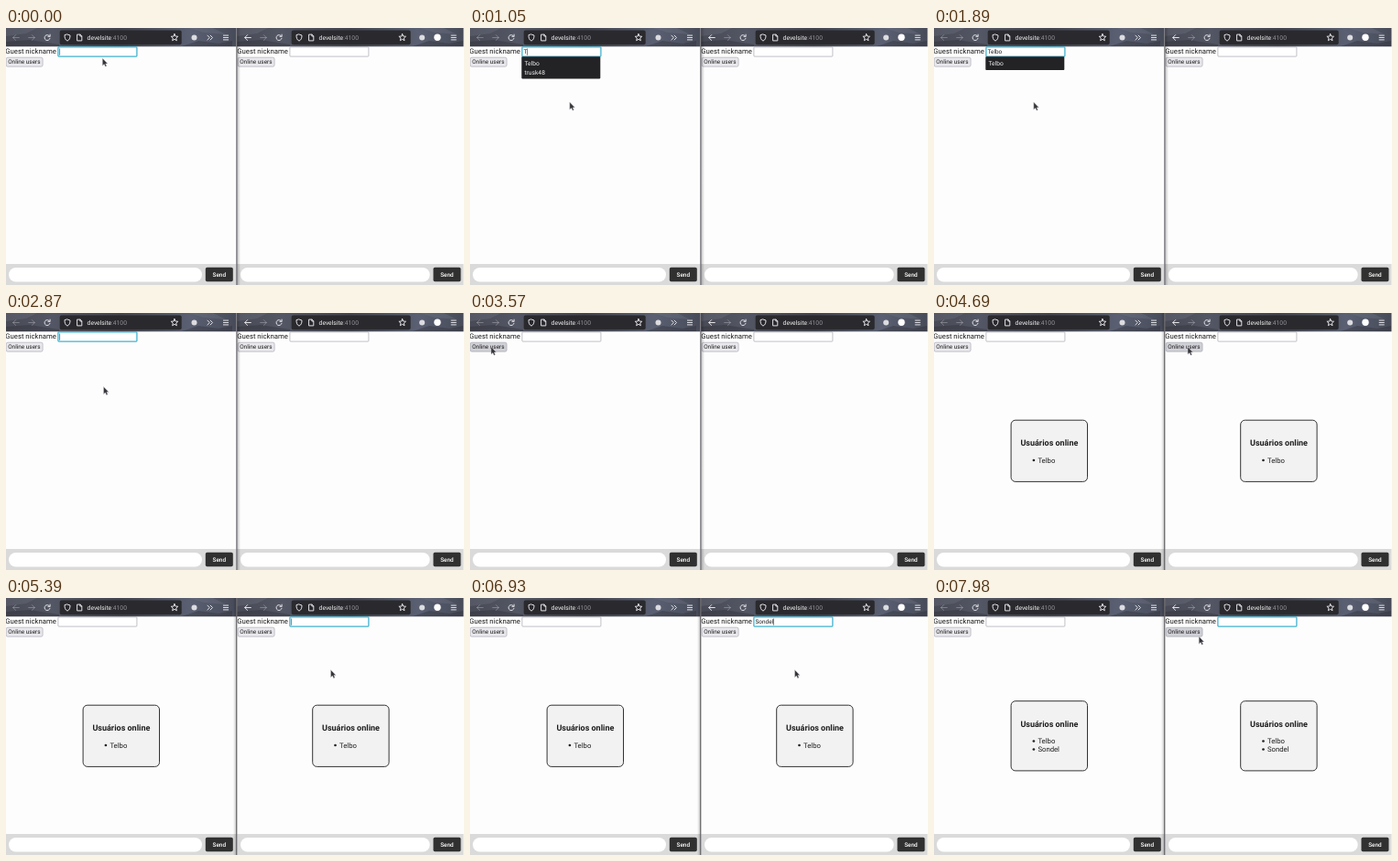
An HTML page that plays this animation: 500x281 px, repeating every 8000 ms.

```html
<!DOCTYPE html>
<html lang="en">
<head>
<meta charset="utf-8">
<title>Chat demo</title>
<style>
  html, body { margin: 0; width: 100%; height: 100%; overflow: hidden; background: #fff; }
  svg { display: block; width: 100%; height: 100%; }
  text { font: 7.72px Roboto, sans-serif; fill: #1c1c1c; text-rendering: geometricPrecision; white-space: pre; }
  .small { font-size: 6.43px; }
  .title { font-size: 9.02px; font-weight: 700; }
  .send { font-size: 6.43px; font-weight: 500; fill: #fff; }
  .url { font-size: 6.73px; fill: #f4f4f6; }
  .url tspan { fill: #929298; }
  .popup text { font-size: 6.7px; fill: #eee; }
  .icon { fill: none; stroke: #e2e2e6; stroke-width: 1; stroke-linecap: round; stroke-linejoin: round; }
  .dim { opacity: .32; }
</style>
</head>
<body>
<svg id="stage" viewBox="0 0 500 281" preserveAspectRatio="none">
  <defs>
    <linearGradient id="sky">
      <stop offset="0" stop-color="#484a55"/>
      <stop offset=".2" stop-color="#535664"/>
      <stop offset=".5" stop-color="#41434d"/>
      <stop offset=".8" stop-color="#5a6072"/>
      <stop offset="1" stop-color="#474b59"/>
    </linearGradient>
    <linearGradient id="shade">
      <stop offset="0" stop-color="#000" stop-opacity=".5"/>
      <stop offset="1" stop-color="#000" stop-opacity="0"/>
    </linearGradient>
  </defs>
  <rect width="500" height="281" fill="#fdfdfd"/>
  <g id="windows"></g>
  <rect x="251.2" width="1.2" height="281" fill="#77777c"/>
  <rect id="shadowRight" x="252" width="4" height="281" fill="url(#shade)" opacity=".5"/>
  <rect id="shadowLeft" x="248" width="4" height="281" fill="url(#shade)" opacity=".5" transform="rotate(180 250 140.5)"/>
  <path id="pointer" d="M0 0V8.2L1.9 6.6L3.2 9.3L4.6 8.6L3.4 6H5.7Z" fill="#34343a" stroke="#d8d8dc" stroke-width=".45"/>
</svg>
<script>
const LOOP = 8000, STEP = 70;
const GUESTS = ['Telbo', 'Sondel'];
const SAVED = ['Telbo', 'trusk48'];

// Horizontal origins: page content, right-aligned controls, dialog.
const windows = [
  { id: 'a', x: 0, right: 0, dialog: 0, width: 251.5, urlWidth: 133 },
  { id: 'b', x: 253, right: 248.7, dialog: 250.6, width: 247.5, urlWidth: 130 }
];

// Each entry holds from its time until the next: [time, value].
const timeline = {
  aText: [[0, ''], [980, 'T'], [1260, 'Te'], [1330, 'Tel'], [1400, 'Telb'], [1470, 'Telbo'], [2170, '']],
  aPopup: [[0, []], [1050, SAVED], [1260, SAVED.slice(0, 1)], [2170, []]],
  aCaret: [[0, 1], [630, 0], [980, 1], [1890, 0], [2170, 1], [3570, 0]],
  aFocus: [[0, 1], [3570, 0]],
  aUsers: [[0, 0], [3640, 1], [7280, 2]],
  bText: [[0, ''], [5950, 'S'], [6300, 'So'], [6510, 'Son'], [6650, 'Sond'], [6720, 'Sonde'], [6930, 'Sondel'], [7210, '']],
  bPopup: [[0, []], [6020, SAVED.slice(1)], [6370, []]],
  bCaret: [[0, 0], [5180, 1], [7630, 0]],
  bFocus: [[0, 0], [5180, 1]],
  bUsers: [[0, 0], [4690, 1], [7280, 2]],
  front: [[0, 'a'], [4620, 'b']]
};

// Pointer path: [time, x, y].
const path = [
  [0, 105.3, 33], [70, 105.3, 33], [420, 108.8, 81],
  [2800, 108.8, 81], [2870, 106.5, 80.5], [3150, 62, 56], [3430, 26, 39], [3570, 23, 37],
  [3640, 23, 37], [3850, 82, 58], [4060, 185, 64], [4270, 264, 45], [4340, 274, 41], [4480, 277, 37],
  [4690, 277, 37], [5040, 330, 28], [5180, 336, 26], [5250, 337, 29], [5320, 342.5, 54.5], [5390, 354.5, 78.5],
  [7840, 354.5, 78.5], [7910, 324, 60], [7980, 289.2, 42], [8000, 289.2, 42]
];

const $ = id => document.getElementById(id);
const at = (steps, t) => steps.filter(([time]) => time <= t).pop()[1];
const rect = (x, y, w, h, r, fill, extra = '') =>
  `<rect x="${x}" y="${y}" width="${w}" height="${h}" rx="${r}" fill="${fill}" ${extra}/>`;
const label = (x, y, text, cls = '') => `<text x="${x}" y="${y}" class="${cls}">${text}</text>`;
const icon = (x, d, cls = '') => `<path class="icon ${cls}" transform="translate(${x} 10.5)" d="${d}"/>`;

const ARROW = 'M3.3 0H-3.3M-.4 -2.9L-3.3 0L-.4 2.9';
const FORWARD = 'M-3.3 0H3.3M.4 -2.9L3.3 0L.4 2.9';
const RELOAD = 'M2.7 -1.4A3 3 0 1 0 3 .8M3.1 -3.4V-1.2H.9';
const SHIELD = 'M0 -3.5L3 -2.5C3 .6 2.3 2.5 0 3.6C-2.3 2.5 -3 .6 -3 -2.5Z';
const PAGE = 'M-2.3 -3.4H.8L2.5 -1.7V3.4H-2.3ZM.6 -3.3V-1.5H2.4';
const MENU = 'M-2.6 -2.4H2.6M-2.6 0H2.6M-2.6 2.4H2.6';
const MORE = 'M-2.6 -2.4L-.2 0L-2.6 2.4M.6 -2.4L3 0L.6 2.4';
const STAR = 'M' + Array.from({ length: 10 }, (_, i) => {
  const r = i % 2 ? 1.8 : 4, a = i * Math.PI / 5;
  return `${(r * Math.sin(a)).toFixed(2)} ${(-r * Math.cos(a)).toFixed(2)}`;
}).join('L') + 'Z';

function toolbar({ id, x, right, width, urlWidth }) {
  const left = id === 'a';
  const start = left ? 0 : 252;
  return rect(start, 0, width, 20.3, 0, 'url(#sky)') +
    `<path d="M${start} 0h34l-12 6l-22 3zM${start + 200} 0h26l14 7l-24 -2z" fill="#747987" opacity=".3"/>` +
    `<path d="M${start} 20v-5l26 -2l32 5v2zM${start + 192} 20l18 -6l22 3l15 -3v6z" fill="#2d2e36" opacity=".4"/>` +
    rect(x + 58.7, 2.4, urlWidth, 15.8, 2, '#2a2a2e') +
    icon(x + 11, ARROW, left ? 'dim' : '') + icon(x + 28, FORWARD, 'dim') + icon(x + 45, RELOAD) +
    icon(x + 67, SHIELD) + icon(x + 80.3, PAGE) +
    label(x + 88.6, 12.8, 'develsite<tspan>:4100</tspan>', 'url') +
    icon(right + 184, STAR) +
    `<circle cx="${right + 205.5}" cy="10.5" r="3" fill="#dcdce0"/>` +
    (left ? icon(222.5, MORE) : '<circle cx="471" cy="10.3" r="3.7" fill="#fff"/>') +
    icon(right + 240, MENU);
}

function page({ id, x, right, width }) {
  const barStart = id === 'a' ? 0 : 252;
  return label(x - .7, 28.2, 'Guest nickname') +
    rect(x + 56.9, 20.9, 86, 10.2, .8, '#fff', `id="${id}Field"`) +
    label(x + 58.5, 28.3, '', 'small').replace('<text', `<text id="${id}Text"`) +
    rect(x + 58.5, 22.5, .55, 7.3, 0, '#222', `id="${id}Caret"`) +
    rect(x + .2, 32.2, 39.9, 10, 1.8, '#e9e9ed', `id="${id}Button" stroke="#8f8f9d" stroke-width=".5"`) +
    label(x + 2.2, 39.4, 'Online users', 'small') +
    rect(barStart, 258, width, 23, 0, '#dadada') +
    rect(x + 3, 262, right + 214 - x - 3, 15.4, 7.7, '#fff') +
    rect(right + 217.8, 261.8, 30, 15.4, 1.8, '#303030') +
    label(right + 225.5, 271.9, 'Send', 'send') +
    `<g id="${id}Dialog"></g><g id="${id}Popup" class="popup"></g>`;
}

function dialog(x, count) {
  if (!count) return '';
  const height = 58.2 + 9 * count, top = 150.8 - height / 2;
  const items = GUESTS.slice(0, count).map((name, i) => {
    const y = top + 46.3 + 9 * i;
    return `<circle cx="${x + 108.9}" cy="${y - 2.5}" r="1.35" fill="#222"/>` + label(x + 113.4, y, name);
  }).join('');
  return rect(x + 84.1, top, 83.4, height, 4.8, '#f2f2f2', 'stroke="#333" stroke-width="1"') +
    label(x + 94.4, top + 28.2, 'Usuários online', 'title') + items;
}

function popup(x, names) {
  if (!names.length) return '';
  return rect(x + 56.3, 31.2, 86, 5.4 + 9.4 * names.length, .8, '#232325') +
    names.map((name, i) => label(x + 59.4, 41.3 + 9.5 * i, name)).join('');
}

function setContent(node, html) {
  if (node.dataset.html === html) return;
  node.dataset.html = html;
  node.innerHTML = html;
}

function pointerAt(t) {
  const i = Math.max(1, path.findIndex(([time]) => time >= t));
  const [t0, x0, y0] = path[i - 1], [t1, x1, y1] = path[i];
  const k = (t - t0) / (t1 - t0);
  return [x0 + (x1 - x0) * k, y0 + (y1 - y0) * k];
}

function render(time) {
  const t = Math.floor((time % LOOP) / STEP) * STEP;
  const [px, py] = pointerAt(t);
  for (const { id, x, dialog: dialogX } of windows) {
    const value = key => at(timeline[id + key], t);
    const field = $(id + 'Field'), text = $(id + 'Text'), caret = $(id + 'Caret');
    const focused = value('Focus');
    field.setAttribute('stroke', focused ? '#43b3cf' : '#8f8f9d');
    field.setAttribute('stroke-width', focused ? 1.3 : .55);
    text.textContent = value('Text');
    caret.setAttribute('x', x + 58.5 + (text.textContent ? text.getComputedTextLength() : 0));
    caret.setAttribute('opacity', value('Caret'));
    const hover = px > x && px < x + 40 && py > 32 && py < 42.3;
    $(id + 'Button').setAttribute('fill', hover ? '#d0d0d7' : '#e9e9ed');
    setContent($(id + 'Dialog'), dialog(dialogX, value('Users')));
    setContent($(id + 'Popup'), popup(x, value('Popup')));
  }
  const front = at(timeline.front, t);
  $('shadowRight').style.display = front === 'a' ? '' : 'none';
  $('shadowLeft').style.display = front === 'b' ? '' : 'none';
  $('pointer').setAttribute('transform', `translate(${px} ${py})`);
}

$('windows').innerHTML = windows.map(w => toolbar(w) + page(w)).join('');
const start = performance.now();
function tick() {
  render(performance.now() - start);
  requestAnimationFrame(tick);
}
tick();
</script>
</body>
</html>
```
